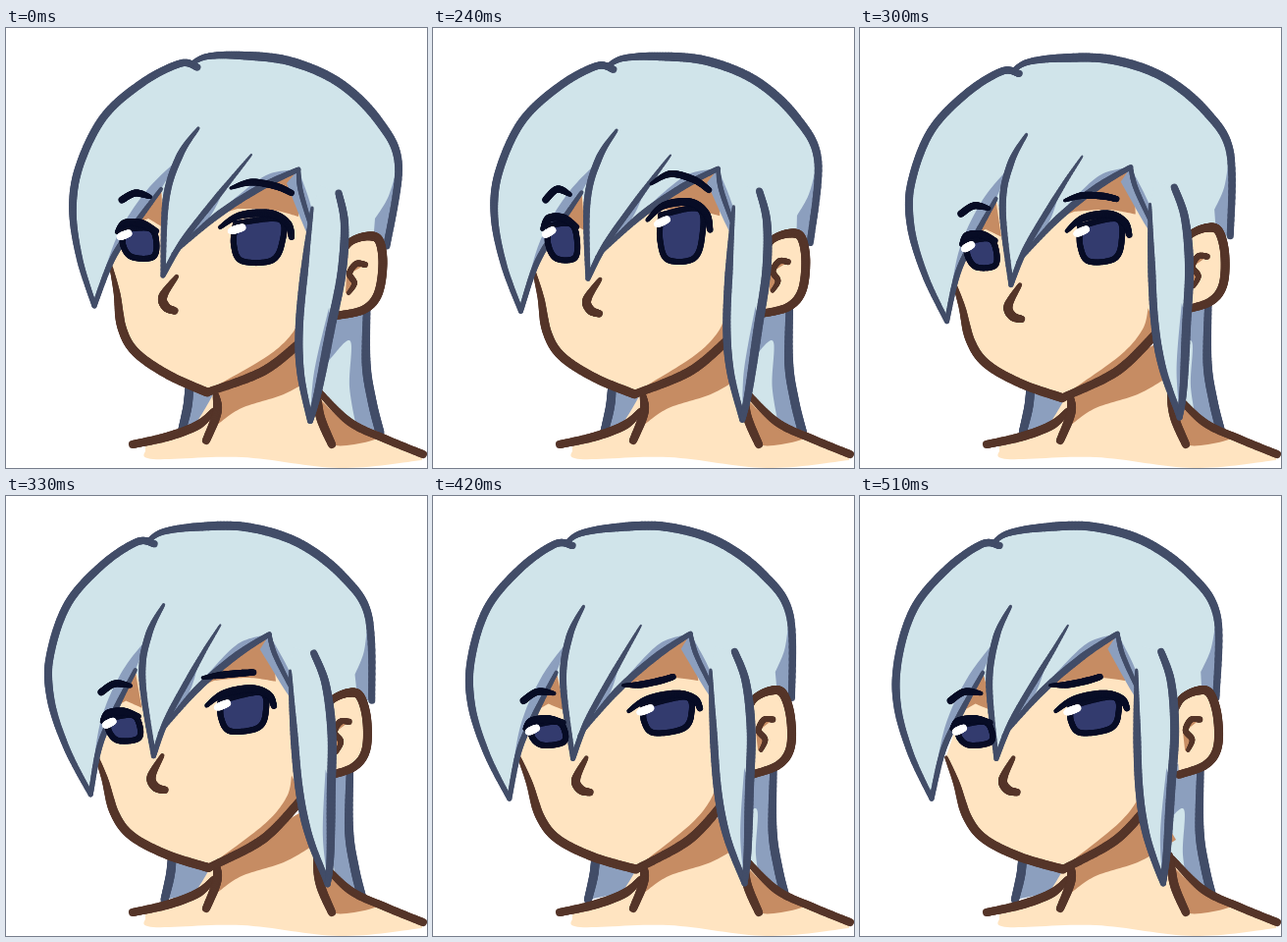
Recreate the animation shown at these times as an HTML page with a canvas. Size 429 by 448 pixels, loop 0.87 s.

```html
<!DOCTYPE html>
<html lang="en">
<head>
<meta charset="utf-8">
<title>Head turn</title>
<style>
html, body { margin: 0; width: 100%; height: 100%; overflow: hidden; background: #fff; }
canvas { display: block; }
</style>
</head>
<body>
<canvas id="stage" width="429" height="448"></canvas>
<script>
const ctx = document.getElementById('stage').getContext('2d');

const HAIR = '#d0e4ea', HAIR_SHADE = '#8c9fbe', HAIR_LINE = '#424d68';
const SKIN = '#ffe4c1', SKIN_SHADE = '#c68c63', SKIN_LINE = '#553529';
const INK = '#080d26', IRIS = '#333b6e';

// Progress per 30 ms step: 0..1 turns the head, 1..2 lets the hair settle.
const PROGRESS = [0, .03, .1, .21, .42, .62, .83, 1, 1.3, 1.58, 1.75, 1.9, 2];
const KEYS = [0, .21, .62, 1, 2];

function track(p, values) {
  const i = KEYS.findIndex(k => k >= p);
  if (i <= 0) return values[0];
  const f = (p - KEYS[i - 1]) / (KEYS[i] - KEYS[i - 1]);
  return values[i - 1] + (values[i] - values[i - 1]) * f;
}

// Movers map a resting point to its place at progress p.
const still = (x, y) => [x, y];
const trail = (x, y, p) => [x - 21 * Math.min(p, 1), y];
const head = (x, y, p) => {
  const turn = Math.min(p, 1);
  return [x - .165 * (360 - y) * turn, y + .14 * (270 - x) * turn];
};
const hair = (x, y, p) => {
  const hang = Math.max(0, Math.min(1.6, (y - 150) / 150));
  const [hx, hy] = head(x, y, p);
  return [hx + 8 * hang * track(p, [0, .3, .9, 1, -.6]), hy];
};
const feature = (cx, cy, wide, tall, drop, shift) => (x, y, p) => {
  const t = Math.min(p, 1);
  const [hx, hy] = head(cx + (x - cx) * track(t, wide), cy + (y - cy) * track(t, tall), p);
  return [hx + shift * t, hy + track(t, drop)];
};

// Catmull-Rom curve through "x y x y ..."
function curve(text) {
  const v = text.split(' ').map(Number), last = v.length / 2 - 1, out = [];
  const at = (i, axis) => v[2 * Math.max(0, Math.min(last, i)) + axis];
  for (let i = 0; i < last; i++) {
    for (let u = 0; u < 1; u += .0625) {
      out.push([0, 1].map(axis => {
        const [a, b, c, d] = [-1, 0, 1, 2].map(n => at(i + n, axis));
        return b + u * (c - a + u * (2 * a - 5 * b + 4 * c - d + u * (3 * (b - c) + d - a))) / 2;
      }));
    }
  }
  out.push([at(last, 0), at(last, 1)]);
  return out;
}
const back = line => [...line].reverse();

const parts = [];
let mover = still;
const fill = (color, ...lines) => parts.push({ color, mover, line: lines.flat() });
const brush = (color, line, width, start, end) =>
  parts.push({ color, mover, line, width, start, end });

// Back hair
mover = trail;
const tailLeft = curve('187 362 185 385 179 411');
const tailRight = curve('368 275 367 340 373 380 381 412');
fill(HAIR_SHADE, tailLeft, [[235, 400], [235, 360]]);
fill(HAIR_SHADE, tailRight, [[335, 405], [318, 270]]);
fill(HAIR, curve('316 358 332 335 351 319 350 365 357 407'), [[335, 400]]);
brush(HAIR_LINE, tailLeft, 9, 8, 8);
brush(HAIR_LINE, tailRight, 9, 7, 9);

// Neck and shoulders
mover = still;
const shoulder = curve('317 368 350 401 388 419 425 434');
fill(SKIN, curve('142 426 185 411 213 370'), [[300, 325]], shoulder,
  curve('424 440 340 448 240 437 150 439 142 430'));
fill(SKIN_SHADE, [[213, 372]], curve('215 404 240 387 285 372 322 350'), [[304, 320]]);
fill(SKIN_SHADE, curve('320 378 326 402 336 425 383 415 342 397 320 378'));
brush(SKIN_LINE, curve('129 424 165 416 196 404 212 389'), 9, 8, 5);
brush(SKIN_LINE, curve('214 374 215 392 204 420'), 9, 6, 8);
brush(SKIN_LINE, shoulder, 8, 6, 8);
brush(SKIN_LINE, curve('316 365 320 395 332 424'), 9, 5, 8);

// Face
mover = head;
const cheek = curve('107 243 113 270 118 305 132 330 165 353 205 371');
const jaw = curve('205 371 250 355 275 341 308 313');
fill(SKIN, cheek, jaw, [[330, 160], [150, 160]]);
fill(SKIN_SHADE, jaw, curve('301 288 293 309 268 333 215 364'));
fill(SKIN_SHADE, [[158, 158], [130, 200]], curve('145 194 160 203'));
fill(SKIN_SHADE, [[300, 143], [210, 192]], curve('236 184 270 185 298 192'));
brush(SKIN_LINE, cheek, 9, 3, 9);
brush(SKIN_LINE, jaw, 9, 8, 9);
brush(SKIN_LINE, curve('174 253 160 273 163 284 172 288'), 9, 4, 7);

// Hair
mover = hair;
const rear = curve('90 283 75 235 68 185 75 140 100 90 140 55 178 36 195 40');
const crown = curve('188 37 205 29 240 28 290 34 340 56 380 95 400 140 388 222');
const lock = curve('90 283 108 236 130 202 158 164');
const bangEdge = curve('196 102 177 130 163 175 160 252');
const bangInner = curve('160 252 180 217 215 172 250 129');
const fringe = curve('170 230 215 191 260 162 298 144');
const temple = curve('298 144 300 165 310 200');

fill(HAIR, rear, crown, [[340, 235]], back(temple), back(fringe),
  curve('160 252 160 185 158 164'), back(lock));
fill(HAIR_SHADE, lock, curve('176 133 142 167 112 215 90 283'));
fill(HAIR_SHADE, bangInner, curve('222 165 205 196 170 230'));
fill(HAIR_SHADE, curve('298 144 265 150 225 180'), fringe);
fill(HAIR_SHADE, curve('298 144 312 187 310 215 286 158'));
fill(HAIR_SHADE, curve('398 145 389 173 376 194'), [[374, 220], [390, 222]]);
brush(HAIR_LINE, rear, 8, 5, 7);
brush(HAIR_LINE, crown, 9, 4, 7);
brush(HAIR_LINE, lock, 6, 5, 4);
brush(HAIR_LINE, bangEdge, 7, 3, 5);
brush(HAIR_LINE, bangInner, 6, 5, 2);
brush(HAIR_LINE, fringe, 7, 3, 5);
brush(HAIR_LINE, temple, 5, 4, 4);

// Ear
mover = head;
const ear = curve('343 228 352 217 368 212 380 216 384 240 379 271 364 287 336 293');
const earFold = curve('366 241 357 240 350 250 355 260 349 270');
fill(SKIN, ear);
fill(SKIN_SHADE, earFold, [[346, 270], [347, 252]]);
brush(SKIN_LINE, ear, 9, 6, 8);
brush(SKIN_LINE, earFold, 6, 7, 4);

// Side lock
mover = hair;
const sideInner = curve('312 183 306 230 299 300 300 350 310 400');
const sideOuter = curve('339 168 345 200 342 250 330 310 318 370 310 400');
fill(HAIR, sideInner, back(sideOuter), [[320, 160]]);
fill(HAIR_SHADE, curve('329 285 314 350 310 400'), curve('320 365 332 310'));
brush(HAIR_LINE, sideInner, 8, 3, 6);
brush(HAIR_LINE, sideOuter, 9, 7, 6);

// Eyes and brows
function eye(iris, lid, shine) {
  fill(IRIS, iris);
  brush(INK, iris, 6, 6, 6);
  brush(INK, lid, 8, 4, 6);
  brush('#fff', shine, 8, 4, 7);
}
const WIDE = [1, .87, .86, .98], OPEN = [1, 1.2, .95, .74], LEVEL = [0, -2, -2, 0];
mover = feature(136, 236, WIDE, OPEN, LEVEL, 4);
eye(curve('121 205 119 220 128 233 150 233 153 216 146 204 121 205'),
  curve('113 208 121 199 138 199 153 207'), curve('115 213 125 209'));
mover = feature(257, 237, WIDE, OPEN, LEVEL, 5);
eye(curve('234 199 232 220 240 237 270 237 281 220 279 195 234 199'),
  curve('218 203 238 191 269 189 287 199 291 213'), curve('228 207 241 203'));
mover = feature(132, 170, [1, .87, 1, 1.1], [1, 1.5, 1, 1], [0, -7, 1, 12], 6);
brush(INK, curve('118 175 132 168 147 172'), 7, 7, 4);
mover = feature(260, 162, [1, .95, .85, .83], [1, 1.6, .6, -.3], [0, -6, 10, 26], -8);
brush(INK, curve('229 163 250 157 275 161 291 168'), 7, 3, 6);

function paint({ color, mover, line, width, start, end }, p) {
  const points = line.map(([x, y]) => mover(x, y, p));
  ctx.fillStyle = ctx.strokeStyle = color;
  if (!width) {
    ctx.beginPath();
    points.forEach(([x, y]) => ctx.lineTo(x, y));
    ctx.fill();
    return;
  }
  for (let i = 1; i < points.length; i++) {
    const u = (i - .5) / (points.length - 1);
    ctx.lineWidth = Math.min(start + (width - start) * Math.min(1, u * 3),
                             end + (width - end) * Math.min(1, (1 - u) * 3));
    ctx.beginPath();
    ctx.moveTo(...points[i - 1]);
    ctx.lineTo(...points[i]);
    ctx.stroke();
  }
}

ctx.lineCap = 'round';
function frame() {
  const time = performance.now() % 870;
  const step = Math.max(0, Math.min(12, Math.floor((time - 150) / 30)));
  ctx.clearRect(0, 0, 429, 448);
  parts.forEach(part => paint(part, PROGRESS[step]));
  requestAnimationFrame(frame);
}
frame();
</script>
</body>
</html>
```
